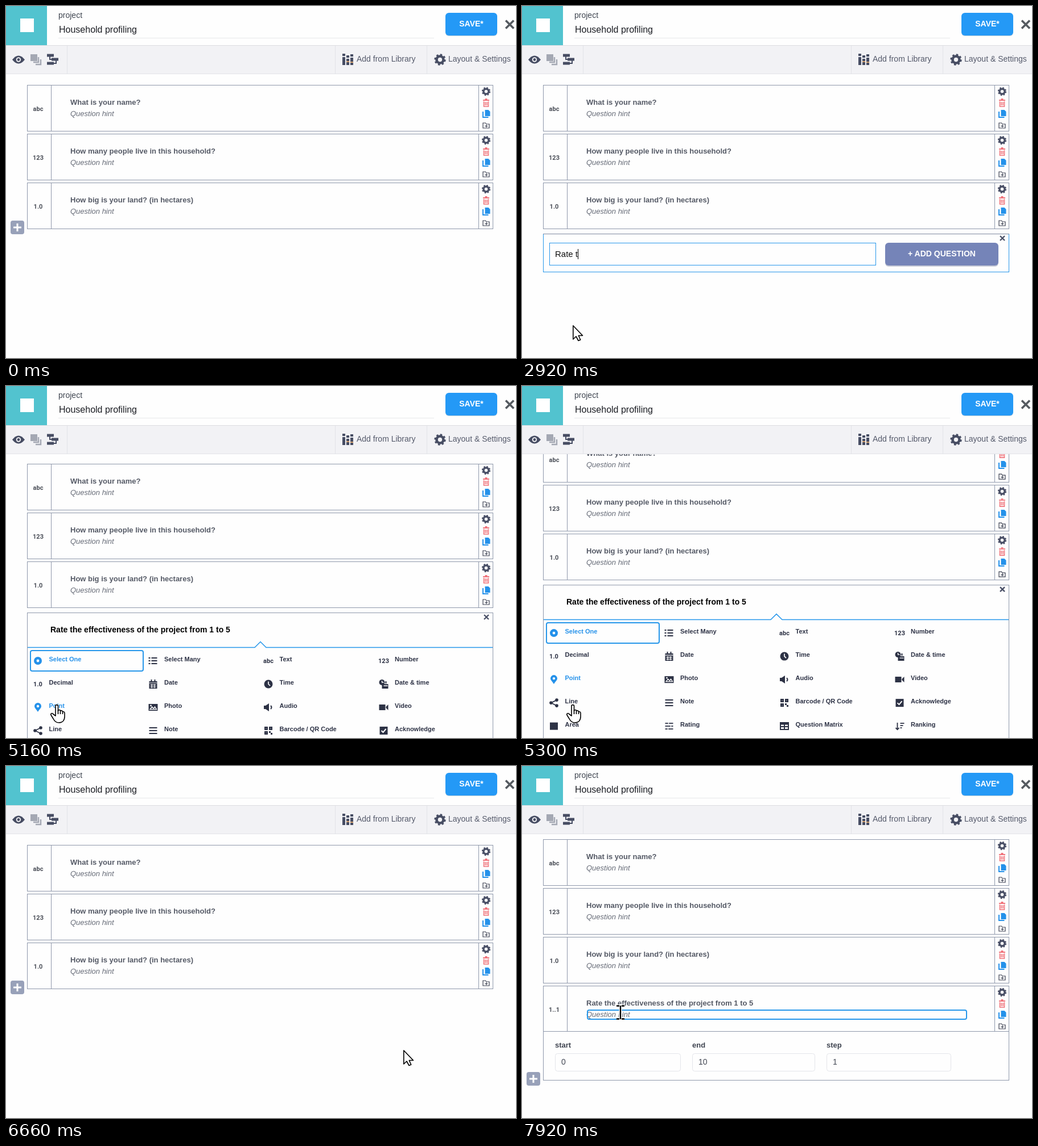
An HTML page that plays this animation: 896 by 620 pixels, repeating every 8000 ms.

```html
<!DOCTYPE html>
<html lang="en">
<head>
<meta charset="utf-8">
<title>Form builder</title>
<style>
  html, body { margin: 0; width: 100%; height: 100%; overflow: hidden; background: #fefefe; }
  svg { display: block; width: 896px; height: 620px; font-family: "Liberation Sans", Arial, sans-serif; }
  text { white-space: pre; fill: currentColor; }
  .b { font-weight: 700; }
  .code { font: 700 11px Roboto, sans-serif; text-anchor: middle; }
  .line { fill: none; stroke: #8f98ab; }
  .blue { fill: none; stroke: #2797ea; }
  .pick { color: #2d3245; }
  .pick.on { color: #2491ea; }
  .ico { fill: currentColor; }
  .stroke { fill: none; stroke: currentColor; }
  .cursor { fill: #fff; stroke: #000; stroke-width: 1.6; stroke-linejoin: round; }
</style>
</head>
<body>
<svg id="stage" viewBox="0 0 896 620" xmlns="http://www.w3.org/2000/svg"></svg>
<script>
const LOOP = 8000;
const QUESTION = 'Rate the effectiveness of the project from 1 to 5';
const $ = id => document.getElementById(id);

const put = (x, y, body, attrs = '') => `<g transform="translate(${x} ${y})" ${attrs}>${body}</g>`;
const label = (x, y, size, str, attrs = '') =>
  `<text x="${x}" y="${y}" font-size="${size}" ${attrs}>${str.replace(/&/g, '&amp;')}</text>`;
const box = (x, y, w, h, attrs) => `<rect x="${x}" y="${y}" width="${w}" height="${h}" ${attrs}/>`;
const solid = d => `<path class="ico" d="${d}"/>`;
const stroke = (d, w = 2) => `<path class="stroke" stroke-width="${w}" d="${d}"/>`;
const white = (d, w = 1.5) => `<path fill="none" stroke="#fefefe" stroke-width="${w}" d="${d}"/>`;
const disc = (x, y, r) => `<circle class="ico" cx="${x}" cy="${y}" r="${r}"/>`;
const code = str => label(0, 4, 11, str, 'class="code"');
const gear = r => `<circle class="stroke" r="${r * .6}" stroke-width="${r * .46}"/>
  <circle class="stroke" r="${r * .87}" stroke-width="${r * .3}" stroke-dasharray="${Math.PI * r * .87 / 8}"/>`;

const bars = 'M-3-5H7M-3 0H7M-3 5H7';
const pad = 'M-6-4H7V7H-6Z';
const items = [
  ['Select One', disc(0, 0, 7) + '<circle r="2.4" fill="#fefefe"/>'],
  ['Select Many', stroke(bars + 'M-8-5H-5M-8 0H-5M-8 5H-5')],
  ['Text', code('abc')],
  ['Number', code('123')],
  ['Decimal', code('1.0')],
  ['Date', solid('M-7-5H7V8H-7ZM-4-8H-2V-4H-4ZM2-8H4V-4H2Z') + white('M-7-2H7M-5 1.5H5M-5 5H5M-2.5 0V7M2.5 0V7', 1.2)],
  ['Time', disc(0, 0, 7.5) + white('M0-4.5V0L3 3', 1.7)],
  ['Date & time', solid('M-3 0H8V8H-3ZM3-5H5V-1H3Z') + disc(-3, -3, 5) + white('M-3-6V-3H0M0 3H7', 1.3)],
  ['Point', solid('M0 8C-3 3-6 1-6-2A6 6 0 0 1 6-2C6 1 3 3 0 8Z') + '<circle cy="-2" r="2.2" fill="#fefefe"/>'],
  ['Photo', solid('M-8-6H8V6H-8Z') + white('M-5.5 3.5L-2-1 1 2 3-1 6 3.5Z', 1.3) + '<circle cx="-4" cy="-3" r="1.4" fill="#fefefe"/>'],
  ['Audio', solid('M-8-3H-5L1-7V7L-5 3H-8Z') + stroke('M4-3Q7 0 4 3', 2)],
  ['Video', solid('M-8-5H3V5H-8ZM4-1L8-5V5L4 1Z')],
  ['Line', stroke('M5-5L-5 0 5 5', 1.7) + disc(5, -5, 2.8) + disc(-5, 0, 2.8) + disc(5, 5, 2.8)],
  ['Note', stroke('M-7-5H7M-7 0H7M-7 5H7', 2)],
  ['Barcode / QR Code', solid('M-7-7H-1V-1H-7ZM1-7H7V-1H1ZM-7 1H-1V7H-7ZM1 1H4V4H1ZM4 4H7V7H4Z') + white('M-4.5-4H-3.5M3.5-4H4.5M-4.5 4H-3.5', 1)],
  ['Acknowledge', solid('M-7-7H7V7H-7Z') + white('M-4 0L-1 3 4-3', 2)],
  ['Area', solid('M-7-6.5H7V6.5H-7Z')],
  ['Rating', stroke('M-7-5H7M-7 0H7M-7 5H7', 1.8) + white('M-1-7V-3M3-2V2M-2 3V7', 1.4)],
  ['Question Matrix', stroke('M-7-6H7V6H-7ZM-7 1H7M0-5V6') + stroke('M-7-4H7', 3)],
  ['Ranking', stroke('M-4-6V5M-7 3L-4 6-1 3M1-5H8M1-1H6M1 3H4', 1.8)],
  ['Calculate', code('1+1')],
  ['Hidden', stroke('M-9 0Q0-11 9 0Q0 11-9 0Z') + disc(0, 0, 3.4) + white('M-7-8L9 6', 2) + stroke('M-8-7L8 7')],
  ['File', solid('M-6-8H2L6-4V8H-6Z') + white('M2-8V-4H6', 1)],
  ['Range', code('1..1')],
  ['External XML', solid('M-6-8H3L6-5V1H2V8H-6Z') + white('M-3-3V4M0-3V4', 1.2) + solid('M1 3H9V9H1Z') + stroke('M3 4V1H7V4', 1.4)]
];

const bin = stroke('M-5.5-5H5.5M-2-7H2', 1.8) + stroke('M-4-3V6H4V-3M-1.4-2V4M1.4-2V4', 1.6);
const copy = solid('M-2-7H4L7-4V4H-2Z') + stroke('M-5.5-4V6H4', 2);
const folder = stroke('M-5.5 4.5V-4.5H-1L.5-2.5H5.5V4.5ZM-2 1H3M.5-1.5V3.5', 1.2);

function row(i, type, title, height = 81) {
  const y = 139 + 86 * i;
  return put(0, y, box(37.5, .5, 818, height, 'class="line"')
    + '<path class="line" d="M79.5 .5V81M830.5 .5V81"/>'
    + put(56.5, 42, code(type), 'color="#4b4f58"')
    + label(113, 35, 13, title, 'class="b" color="#555a66"')
    + label(113, 55, 13, 'Question hint', 'font-style="italic" color="#666b77"')
    + put(843.5, 11.5, gear(7.5), 'color="#4a5067"')
    + put(843.5, 32, bin, 'color="#f0737b"')
    + put(843.5, 51, copy, 'color="#2491ea"')
    + put(843.5, 71.5, folder, 'color="#3c4152"'));
}

function field(x, w, name, value) {
  return label(x, 506, 13, name, 'class="b" color="#3f4450"')
    + box(x + .5, 516.5, w, 31, 'rx="4" fill="none" stroke="#e4e5ea"')
    + label(x + 11, 536, 14, value, 'color="#444955"');
}

const cross = put(844, 409, stroke('M-4-4L4 4M4-4L-4 4', 2.4), 'color="#4a5067"');

const menu = items.map(([name, icon], i) =>
  put(42 + 202.5 * (i % 4), 485 + 41 * Math.floor(i / 4),
    put(14, 1, icon) + label(33.5, 2, 11, name, 'class="b"'), 'class="pick"')).join('');

const header = `
  <rect width="896" height="69" fill="#fefefe"/>
  <rect width="72" height="69" fill="#52c3cf"/>
  ${box(25, 22, 24, 24, 'fill="#fff"')}
  ${label(92, 21, 14, 'project', 'color="#3f4550"')}
  ${label(93, 47, 16, 'Household profiling', 'color="#1c1e24"')}
  <path d="M92 56.5H752" stroke="#e7e8ea"/>
  ${box(772, 13, 91, 40, 'rx="6" fill="#c9d3dd"')}
  ${box(772, 12, 91, 40, 'rx="6" fill="#2499f6"')}
  ${label(817.5, 36, 14, 'SAVE*', 'class="b" text-anchor="middle" color="#fff"')}
  ${put(885, 32.5, stroke('M-7-7L7 7M7-7L-7 7', 3.6), 'color="#555a60"')}
  ${box(0, 69, 896, 51, 'fill="#f2f2f5"')}
  <path d="M0 69.5H896" stroke="#dcdde1"/><path d="M0 119.5H896M107.5 70V119M578.5 70V119M739.5 70V119" stroke="#e2e3e8"/>
  <g color="#474d63">
    ${put(22, 94.5, solid('M-11 0Q0-14 11 0Q0 14-11 0Z') + '<circle r="4.2" fill="#f2f2f5"/>' + disc(0, 0, 2.4))}
    ${put(52, 94, solid('M-9-9H3V3H-9Z') + stroke('M5-4V5H-4M9 0V9H0', 2.4), 'color="#a4a8b3"')}
    ${put(82, 94, stroke('M-10-7H2M-2 0H10M-10 7H2', 5) + stroke('M-5-6V0H0M6 0V7H0', 2))}
    ${put(600, 94, solid('M-9-10H-4V10H-9ZM-2-7H3V10H-2ZM5-9H10V10H5Z')
      + '<path d="M-9-5H-4M-2-2H3M5-4H10" stroke="#e9eaf0" stroke-width="2"/><path d="M-2 4H3M5 5H10" stroke="#d4a373" stroke-width="2"/>')}
    ${put(762.5, 94.5, gear(10))}
    ${label(616, 98, 14, 'Add from Library', 'color="#555a6b"')}
    ${label(777, 98, 14, 'Layout & Settings', 'color="#555a6b"')}
  </g>`;

$('stage').innerHTML = `
  <defs><clipPath id="reveal"><rect id="revealBox" x="30" y="395" width="840"/></clipPath></defs>
  <rect width="896" height="620" fill="#fefefe"/>
  <g id="page">
    ${row(0, 'abc', 'What is your name?')}
    ${row(1, '123', 'How many people live in this household?')}
    ${row(2, '1.0', 'How big is your land? (in hectares)')}
    <g id="added">
      ${row(3, '1..1', QUESTION, 166)}
      <path class="line" d="M37.5 477.5H855.5"/>
      ${field(58, 220, 'start', '0')}${field(299, 215, 'end', '10')}${field(535, 218, 'step', '1')}
      ${box(115, 440, 666, 16, 'id="focus" rx="3" class="blue" stroke-width="2"')}
    </g>
    <g id="form">
      ${box(37.5, 401.5, 818, 67, 'class="blue"')}
      <path d="M37 401.5H856" stroke="#7f8aa0"/>
      ${box(48.5, 417.5, 573, 39, 'class="blue"')}
      <text id="typed" x="58" y="442" font-size="15" color="#111"></text>
      ${box(0, 428, 1, 18, 'id="caret"')}
      ${box(638, 419, 199, 40, 'rx="6" fill="#c5c9d6"')}
      ${box(638, 417, 199, 40, 'rx="6" fill="#7584b8"')}
      ${label(737.5, 441, 14, '+ ADD QUESTION', 'class="b" text-anchor="middle" color="#fff"')}
      ${cross}
    </g>
    <g id="picker">
      <g clip-path="url(#reveal)">
        <path d="M37.5 462.5H437L447 452.5 457 462.5H855.5" class="blue" stroke-width="1.5"/>
        ${box(43, 468, 198, 36, 'rx="3" class="blue" stroke-width="2"')}
        ${menu}
      </g>
      ${box(37.5, 401.5, 818, 352, 'id="frame" class="line"')}
      ${label(78, 436, 14, QUESTION, 'class="b" color="#000"')}
      ${cross}
    </g>
    <g id="plus">
      ${box(8, 0, 24, 24, 'id="plusBox" rx="4"')}
      <path d="M20 5V19M13 12H27" stroke="#fff" stroke-width="3"/>
    </g>
  </g>
  ${header}
  <g id="pointer">
    <circle id="click" r="18" fill="#ff0" fill-opacity=".55"/>
    <path id="arrow" class="cursor" d="M.8 1V25L6 20 10 27.5 13.7 26 10.3 18.5H17.5Z"/>
    <g id="hand" class="cursor">
      <path d="M-2 1.5C-2-1 2.5-1 2.5 1.5V10C3 8 6.5 8 6.5 10.5C7 9 10.5 9.5 10.5 12C11 11 14 11.5 14 14V20C14 27 10 31 4 31C-1 31-4 28-6 24L-10 17.5C-11 14.5-7.5 13.5-6 16L-2 19Z"/>
      <path d="M2.5 9V16M6.5 11V16M10.5 12V16"/>
    </g>
    <g id="beam" fill="none">
      <path d="M-7-11.5H7M-7 11.5H7M0-12V12" stroke="#fff" stroke-width="5"/>
      <path d="M-7-11.5H-2M2-11.5H7M-7 11.5H-2M2 11.5H7M0-12V12" stroke="#000" stroke-width="2.4"/>
    </g>
  </g>`;

// Keys are [time, value, ...]; values run linearly between them.
function at(keys, t) {
  const n = keys.findIndex(k => k[0] > t);
  if (n < 0) return keys[keys.length - 1].slice(1);
  if (n === 0) return keys[0].slice(1);
  const a = keys[n - 1], b = keys[n], p = (t - a[0]) / (b[0] - a[0]);
  return a.slice(1).map((v, i) => v + (b[i + 1] - v) * p);
}

const path = [
  [120, 513, 592], [400, 330, 520], [700, 75, 395], [830, 22, 364], [900, 38, 366], [970, 38, 369],
  [1180, 28, 383], [1550, 28, 383], [1750, 50, 455], [2050, 89, 562], [5630, 89, 562],
  [5800, 240, 549], [6050, 560, 514], [6240, 698, 501], [6439, 698, 501], [6440, 698, 500],
  [7050, 698, 500], [7250, 590, 540], [7450, 360, 548], [7600, 215, 470], [7650, 168, 440], [7710, 173, 434]
];
const typing = [[2479, 0], [2480, 1], [2920, 6], [3270, 14], [3290, 15], [4000, 32], [4100, 33], [4140, 34], [4380, 35]];
const smooth = p => { p = Math.min(1, Math.max(0, p)); return p * p * (3 - 2 * p); };
const show = (id, on) => $(id).setAttribute('display', on ? 'inline' : 'none');
const within = (v, lo, hi) => v >= lo && v < hi;
const picks = document.querySelectorAll('.pick');

function scrollAt(t) {
  if (within(t, 5160, 6580)) return 2 + 184 * smooth((t - 5230) / 210);
  return t >= 6730 ? 10 : 0;
}

function draw(t) {
  const [x, y] = at(path, t);
  const form = within(t, 1450, 4600), picker = within(t, 4600, 6580), added = t >= 6730;
  const height = 61 + 291 * smooth((t - 4600) / 300);
  $('page').setAttribute('transform', `translate(0 ${-scrollAt(t)})`);
  show('form', form);
  show('picker', picker);
  show('added', added);
  show('focus', t >= 7920);

  $('typed').textContent = QUESTION.slice(0, Math.floor(at(typing, t)[0] + 1e-6));
  if (form) $('caret').setAttribute('x', 58 + Math.round($('typed').getComputedTextLength()));
  $('frame').setAttribute('height', height);
  $('revealBox').setAttribute('height', height + 6);

  // Hover is only refreshed once scrolling has ended.
  const py = y + (t < 5440 ? 0 : 186);
  const hover = picker && py < 401 + height && py > 464
    ? 4 * Math.floor((py - 464) / 41) + Math.floor((x - 42) / 202.5) : -1;
  picks.forEach((el, i) => el.classList.toggle('on', i === 0 || i === hover));

  const onPlus = t < 1450 && within(x, 8, 32) && within(y, 378, 402);
  show('plus', !form && !picker);
  $('plus').setAttribute('transform', `translate(0 ${added ? 549 : 378})`);
  $('plusBox').setAttribute('fill', onPlus ? '#2491ea' : '#98a1b9');

  const onText = added && (within(y, 408, 447) && within(x, 113, 782) || within(y, 506, 538)
    && (within(x, 58, 279) || within(x, 299, 515) || within(x, 535, 754)));
  const hand = onPlus || within(hover, 0, items.length);
  show('pointer', t >= 120);
  $('pointer').setAttribute('transform', `translate(${x} ${y})`);
  show('hand', hand);
  show('beam', onText);
  show('arrow', !hand && !onText);
  show('click', within(t, 1370, 1500) || within(t, 7850, 7920));
}

const start = performance.now();
function tick() {
  draw((performance.now() - start) % LOOP);
  requestAnimationFrame(tick);
}
tick();
</script>
</body>
</html>
```
